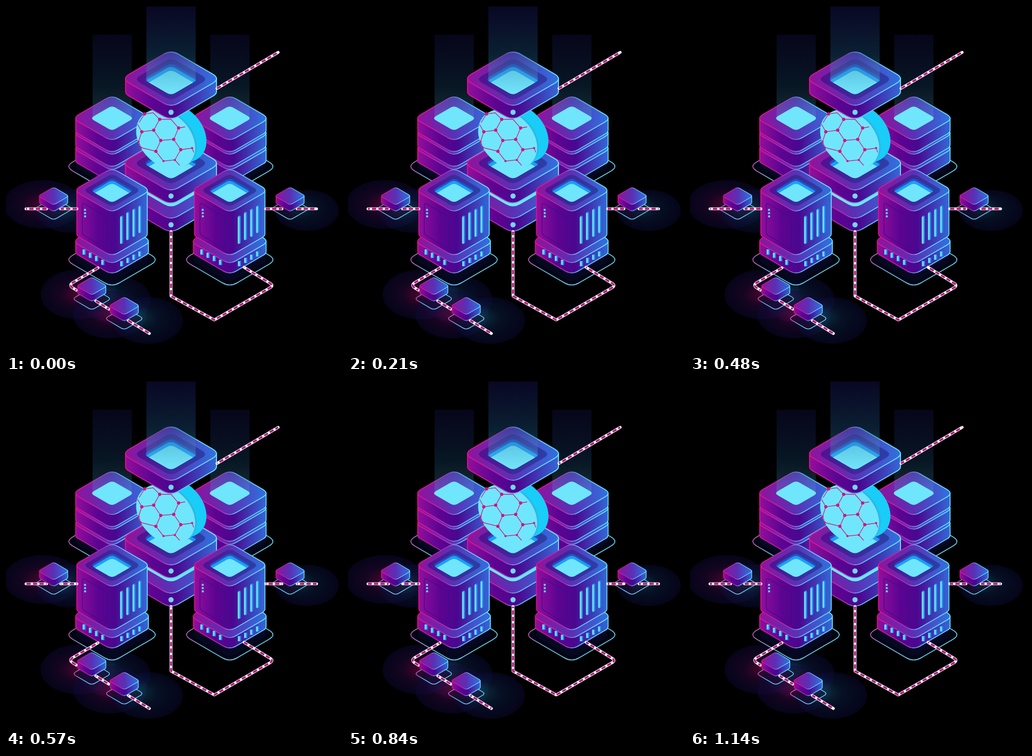
An HTML page without scripts for the animation above (1.17 s loop, 621 by 640 pixels).

```html
<!DOCTYPE html>
<html lang="en">
<head>
<meta charset="utf-8">
<title>Isometric servers</title>
<style>
  html, body { margin: 0; height: 100%; overflow: hidden; background: #000; }
  svg { display: block; width: 100vw; height: 100vh; }
  .top { fill: url(#topFill); stroke: url(#edge); }
  .side { fill: url(#sideFill); stroke: url(#edge); }
  .well { fill: url(#wellFill); }
  .floor { fill: #6fe6fc; }
  .base { fill: #04061a; fill-opacity: .7; stroke: url(#baseEdge); }
  .mat { fill: #1c0c34; fill-opacity: .5; stroke: url(#baseEdge); }
  .cable { fill: none; stroke: #fff; stroke-width: 5.2; stroke-linecap: round; stroke-linejoin: round; }
  .flow { fill: none; stroke: #b8107f; stroke-width: 3.4; stroke-dasharray: 8 4; animation: flow 1170ms steps(39) infinite; }
  .net { fill: none; stroke: #c22a8c; stroke-width: 1.3; }
  .nodes { fill: none; stroke: #d90d80; stroke-linecap: round; }
  .slot { fill: none; stroke-linecap: round; }
  .vent { fill: none; }
  @keyframes flow { to { stroke-dashoffset: -60px; } }
</style>
</head>
<body>
<svg viewBox="0 0 621 640" preserveAspectRatio="none">
  <defs>
    <linearGradient id="edge">
      <stop stop-color="#e5108c"/><stop offset=".4" stop-color="#b02fb4"/>
      <stop offset=".58" stop-color="#5cc4f6"/><stop offset="1" stop-color="#6ee6ff"/>
    </linearGradient>
    <linearGradient id="baseEdge">
      <stop stop-color="#c860c0"/><stop offset=".2" stop-color="#6cc8ee"/><stop offset="1" stop-color="#66e4fa"/>
    </linearGradient>
    <linearGradient id="topFill">
      <stop stop-color="#8f149c"/><stop offset=".5" stop-color="#5a30b4"/><stop offset="1" stop-color="#2f72e0"/>
    </linearGradient>
    <linearGradient id="sideFill">
      <stop stop-color="#920f9c"/><stop offset=".3" stop-color="#5c0492"/>
      <stop offset=".55" stop-color="#4a078f"/><stop offset="1" stop-color="#3468d8"/>
    </linearGradient>
    <linearGradient id="wellFill">
      <stop stop-color="#54108f"/><stop offset="1" stop-color="#2a40a6"/>
    </linearGradient>
    <linearGradient id="beamFill" x2="0" y2="1">
      <stop stop-color="#1c166a" stop-opacity=".34"/>
      <stop offset=".55" stop-color="#1c5586" stop-opacity=".38"/>
      <stop offset="1" stop-color="#78e0fa" stop-opacity=".3"/>
    </linearGradient>
    <radialGradient id="pinkGlow">
      <stop stop-color="#8a0850" stop-opacity=".55"/><stop offset=".5" stop-color="#2a0a42" stop-opacity=".5"/>
      <stop offset="1" stop-color="#0c0a38" stop-opacity=".45"/>
    </radialGradient>
    <radialGradient id="blueGlow" fx=".3" fy=".4">
      <stop stop-color="#16687c" stop-opacity=".55"/><stop offset=".5" stop-color="#0c2048" stop-opacity=".5"/>
      <stop offset="1" stop-color="#0c0a38" stop-opacity=".45"/>
    </radialGradient>

    <path id="tile" d="M-14-45Q0-53 14-45L76-9Q92 0 76 9L14 45Q0 53-14 45L-76 9Q-92 0-76-9Z"/>
    <clipPath id="wellClip"><use href="#tile" transform="scale(.56)"/></clipPath>
    <g id="slab">
      <path class="side" d="M-84 0v24q0 5 8 9l62 36q14 8 28 0l62-36q8-4 8-9V0z"/>
      <use href="#tile" class="top"/>
    </g>
    <g id="thickSlab">
      <path class="side" d="M-84 0v28q0 5 8 9l62 36q14 8 28 0l62-36q8-4 8-9V0z"/>
      <use href="#tile" class="top"/>
    </g>
    <g id="window">
      <use href="#tile" class="well" transform="scale(.75)"/>
      <g clip-path="url(#wellClip)">
        <use href="#tile" fill="#2450c4" transform="scale(.57)"/>
        <use href="#tile" fill="#1e9ef5" transform="translate(0 5) scale(.56)"/>
        <use href="#tile" class="floor" transform="translate(0 12) scale(.56)"/>
      </g>
    </g>

    <g id="stack">
      <use href="#tile" class="base" transform="translate(196 296) scale(.95)" stroke-width="1.6"/>
      <use href="#tile" fill="#060822" transform="translate(196 296) scale(.8)"/>
      <g stroke-width="2">
        <use href="#thickSlab" transform="translate(196 262) scale(.8)"/>
        <use href="#thickSlab" transform="translate(196 234) scale(.8)"/>
        <use href="#thickSlab" transform="translate(196 207) scale(.8)"/>
      </g>
      <path fill="url(#beamFill)" opacity=".72" d="M160 53h72.500V207L196 229 160 207Z"/>
      <use href="#tile" class="floor" transform="translate(196 207) scale(.44)"/>
    </g>

    <g id="server">
      <use href="#tile" class="base" transform="translate(196 468) scale(.95)" stroke-width="1.6"/>
      <use href="#tile" fill="#060822" transform="translate(196 468) scale(.8)"/>
      <use href="#slab" transform="translate(196 434) scale(.8)" stroke-width="2"/>
      <g transform="translate(196 340) scale(.775)" stroke-width="2">
        <path class="side" d="M-84 0v104q0 5 8 9l62 36q14 8 28 0l62-36q8-4 8-9V0z"/>
        <use href="#tile" class="top"/>
        <use href="#window"/>
      </g>
      <path d="M141 367q0-4 4-2l39 23q3 2 3 6v50q0 4-4 2l-39-23q-3-2-3-6z" fill="none" stroke="#450a86" stroke-width="1.2"/>
      <path class="slot" d="M146 376h.1m0 6h.1m0 6h.1" stroke="#5cd8fa" stroke-width="4"/>
      <path class="slot" d="M214 389v47m11.500-54v47m11.500-53v47m11-53v46" stroke="#2387e8" stroke-width="5"/>
      <path class="slot" d="M212.500 390v47m11.500-54v47m11.500-53v47m11-53v46" stroke="#62dffb" stroke-width="3.400"/>
      <path id="vents" class="vent" d="M144.500 449v10m11.500-4v10m11.500-4v10m11.500-3v10M214 470v10m11.500-16v10m11-16v10m11-16v10" stroke="#247fe6" stroke-width="6"/>
      <path class="vent" d="M143.500 449v9m11.500-3v9m11.500-3v9m11.500-2v9M213 471v9m11.500-15v9m11-15v9m11-15v9" stroke="#62dffb" stroke-width="3.600"/>
    </g>

    <use id="mat" href="#tile" class="mat" transform="translate(0 24) scale(.39)" stroke-width="3.600"/>
    <g id="cube" transform="scale(.31)" stroke-width="4">
      <path class="side" d="M-84 0v39q0 5 8 9l62 36q14 8 28 0l62-36q8-4 8-9V0z"/>
      <use href="#tile" class="top"/>
    </g>
    <ellipse id="disc" rx="61.600" ry="46.300" transform="rotate(45)"/>
    <path id="route" d="M390 152 503 85.500M131 374H101M75 374H37M480 374h30M538 374h36M305 416V535L385 579 489 519Q494 515.500 489 512L440 482M170 483 122 511Q117 515 122 519L130 524M166 544 190 559M226 580 265 604"/>
  </defs>

  <rect width="621" height="640"/>

  <g id="glows">
    <ellipse cx="68" cy="366" rx="72" ry="45" fill="url(#pinkGlow)"/>
    <ellipse cx="118" cy="378" rx="62" ry="40" fill="url(#blueGlow)"/>
    <ellipse cx="556" cy="377" rx="59" ry="38" fill="url(#blueGlow)"/>
    <ellipse cx="134" cy="532" rx="70" ry="46" fill="url(#pinkGlow)"/>
    <ellipse cx="202" cy="541" rx="65" ry="43" fill="url(#blueGlow)"/>
    <ellipse cx="192" cy="569" rx="68" ry="44" fill="url(#pinkGlow)"/>
    <ellipse cx="262" cy="580" rx="65" ry="43" fill="url(#blueGlow)"/>
  </g>

  <use href="#stack"/>
  <use href="#stack" x="217.500"/>

  <g id="tower" stroke-width="1.800">
    <use href="#slab" transform="translate(305 342)"/>
    <use href="#tile" class="floor" transform="translate(305 325.500) scale(.9)"/>
    <use href="#slab" transform="translate(305 290)"/>
    <use href="#window" transform="translate(305 290)"/>

    <g id="coin">
      <use href="#disc" x="316" y="234" fill="#18cdf7"/>
      <use href="#disc" x="298" y="244.500" fill="#30b6e6"/>
      <use href="#disc" x="295" y="246" fill="#70e6fc"/>
      <path class="net" d="M246 215 256 199 272 197 284 209 273 229 286 248 310 246 319 225 305 209H284M331 223 319 225M243 218 251 232 273 229M251 232 245 250 249 261 277 268 286 248M277 268 291 286 312 284 323 265 310 246M323 265 344 262 347 270M312 284 321 294"/>
      <path class="nodes" stroke-width="6" d="M256 199h0M284 209h0M251 232h0M273 229h0M286 248h0M310 246h0M319 225h0M277 268h0M323 265h0"/>
      <path class="nodes" stroke-width="4" d="M245 250h0M249 261h0M291 286h0M312 284h0M344 262h0"/>
    </g>

    <use href="#slab" transform="translate(305 134)"/>
    <use href="#window" transform="translate(305 135)"/>
    <path fill="url(#beamFill)" d="M259.500 1h91V136L305 163 259.500 136Z"/>
    <g fill="#74d6f8">
      <circle cx="305" cy="196" r="4.800"/>
      <circle cx="305" cy="350.500" r="4.800"/>
      <circle cx="305" cy="403.500" r="4.800"/>
    </g>
  </g>

  <use href="#server"/>
  <use href="#server" x="217.500"/>

  <use href="#mat" transform="translate(88 350)"/>
  <use href="#mat" transform="translate(525 350)"/>
  <use href="#mat" transform="translate(158.500 516)"/>
  <use href="#mat" transform="translate(218.500 552.500)"/>

  <use href="#route" class="cable"/>
  <use href="#route" class="flow"/>

  <use href="#cube" transform="translate(88 350.500)"/>
  <use href="#cube" transform="translate(525 350.500)"/>
  <use href="#cube" transform="translate(158.500 516.500)"/>
  <use href="#cube" transform="translate(218.500 553)"/>
</svg>
</body>
</html>
```
